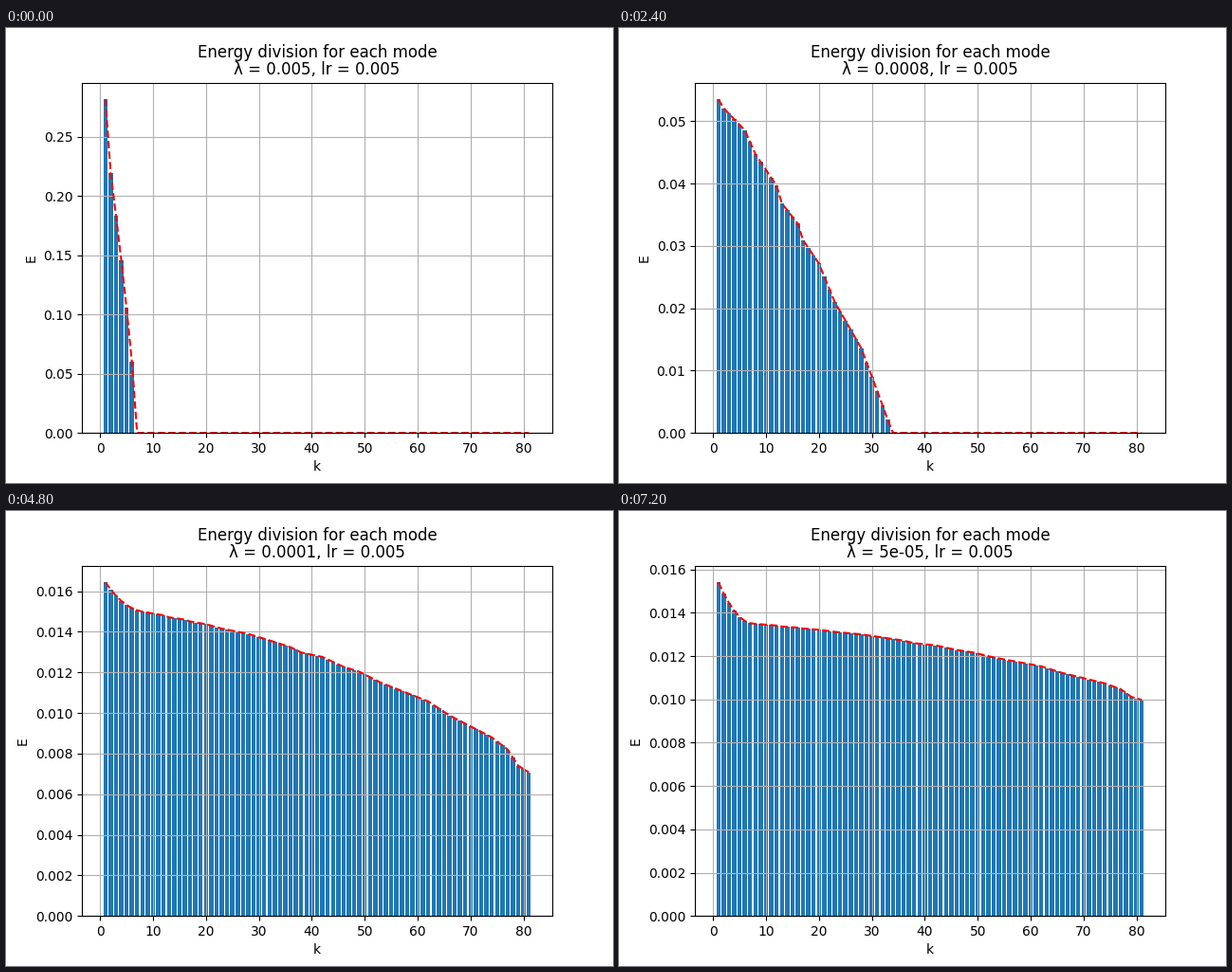
These frames come from a looping animation (640x480 px, 8000 ms). A matplotlib script:

```python
import numpy as np
import matplotlib.pyplot as plt
from matplotlib.animation import FuncAnimation

STEP_MS = 400
STEPS_PER_RUN = 3
STEPS = 20
LR = 0.005
UNIT = 1e-4
MODES = np.arange(1, 82)

# Key points (mode, level) of the spectrum that all runs share
KEYS = [
    (1, 635), (6, 568), (8, 510), (12, 433), (13, 390), (16, 341),
    (17, 301), (20, 244), (23, 150), (28, 38), (32, -100), (36, -244),
    (38, -357), (42, -452), (46, -661), (49, -767), (53, -996),
    (62, -1396), (66, -1694), (74, -2159), (77, -2418), (79, -2763),
    (81, -2901),
]
LEVEL = np.interp(MODES, *zip(*KEYS))
PIVOT = 470   # level of mode 10
LOW = 7       # the boost of the low modes ends here

# lambda, energy at the pivot, slope, energy of mode 1, boost, boost power
RUNS = [
    (0.005, 0, 0, 2818, 2540, 0.8),
    (0.001, 470, 1, 634.8, 0, 1),
    (0.0008, 421, 0.66, 535.4, 0, 1),
    (0.0005, 324, 0.283, 379, 0, 1),
    (0.0001, 149, 0.0232, 164.4, 11.6, 1.8),
    (0.00008, 142.8, 0.0177, 157.9, 12.2, 1.8),
    (0.00005, 134.5, 0.0103, 154.1, 17.9, 1.8),
]


def energies(base, slope, first, boost, power):
    """Scaled shared spectrum, cut at zero, with the low modes lifted."""
    ramp = np.clip((LOW - MODES) / (LOW - 1), 0, 1)
    e = np.maximum(base + slope * (LEVEL - PIVOT), 0) + boost * ramp ** power
    e[0] = first
    return e * UNIT


fig, ax = plt.subplots(figsize=(6.4, 4.8), dpi=100)


def draw(step):
    lam, *params = RUNS[min(step // STEPS_PER_RUN, len(RUNS) - 1)]
    e = energies(*params)
    ax.clear()
    ax.bar(MODES, e)
    ax.plot(MODES, e, "r--")
    ax.set_title(f"Energy division for each mode\nλ = {lam}, lr = {LR}",
                 linespacing=1.0)
    ax.set_xlabel("k")
    ax.set_ylabel("E")
    ax.grid(True)
    return []


anim = FuncAnimation(fig, draw, frames=STEPS, interval=STEP_MS,
                     init_func=lambda: draw(0), repeat=True, repeat_delay=0)
plt.show()
```
